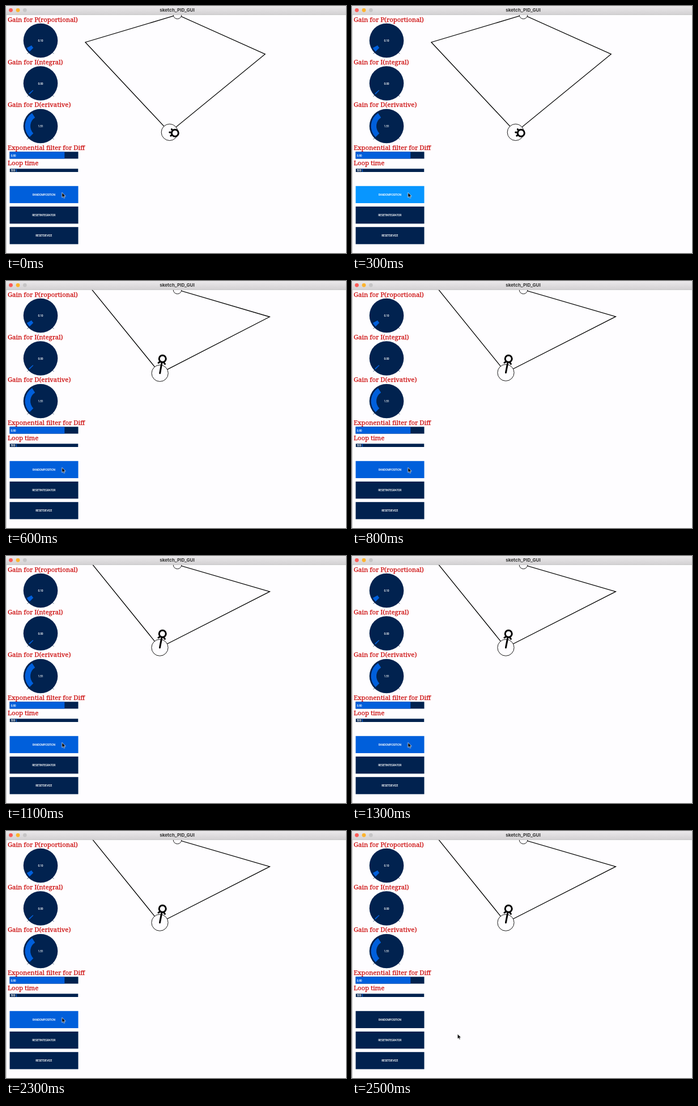
Write an HTML page that moves like this. It is 600 by 436 pixels and loops after 2600 ms.

```html
<!DOCTYPE html>
<html lang="en">
<head>
<meta charset="utf-8">
<title>sketch_PID_GUI</title>
<style>
  html, body { margin: 0; width: 100%; height: 100%; overflow: hidden; background: #fefdff; }
  svg { display: block; width: 100vw; height: 100vh; }
  .title { font: 700 8.1px Inter, sans-serif; fill: #333; text-anchor: middle; }
  .label { font: 11.3px "Noto Serif", serif; fill: #cc0808; stroke: #cc0808; stroke-width: .25; }
  .tiny { font: 500 5px Roboto, sans-serif; letter-spacing: -.25px; fill: #fff; }
  .mid { text-anchor: middle; }
  .navy { fill: #01224f; }
  .blue { fill: #005fdb; }
  .arm { fill: none; stroke: #000; stroke-width: 1.3; }
  .joint { fill: #fefdff; stroke: #000; stroke-width: .9; }
  .bold { fill: #fefdff; stroke: #000; stroke-width: 3; stroke-linecap: round; }
  #press { animation: press 2600ms step-end infinite; }
  #cursor { animation: point 2600ms step-end infinite; }
  @keyframes press {
    0% { fill: #005fdb; }
    7.69% { fill: #0896ff; }
    15.38% { fill: #005fdb; }
    96.15%, 100% { fill: #01224f; }
  }
  @keyframes point {
    0% { transform: translate(98.7px, 329.2px); }
    96.15%, 100% { transform: translate(186.2px, 358.2px); }
  }
</style>
</head>
<body>
<svg viewBox="0 0 600 436">
  <clipPath id="view"><rect y="15.5" width="600" height="421"/></clipPath>
  <clipPath id="thin"><rect x="6.5" y="287.3" width="121" height="5.7"/></clipPath>
  <linearGradient id="bar" x2="0" y2="1">
    <stop stop-color="#ebe9eb"/>
    <stop offset="1" stop-color="#d2d0d2"/>
  </linearGradient>
  <rect width="600" height="436" fill="#fefdff"/>
  <rect width=".8" height="436" fill="#bbb"/>

  <g clip-path="url(#view)">
    <path id="arm" class="arm"/>
    <circle class="joint" cx="302.5" cy="15.5" r="7.3"/>
    <circle id="tool" class="joint" r="14.6"/>
    <path id="force" class="bold"/>
    <circle id="goal" class="bold" r="6"/>
  </g>

  <rect width="600" height="15.5" fill="url(#bar)"/>
  <rect y="15" width="600" height=".6" fill="#b8b7b8"/>
  <circle cx="8.5" cy="7.3" r="3.4" fill="#fc5b57"/>
  <circle cx="21" cy="7.3" r="3.4" fill="#fdb42e"/>
  <circle cx="33.3" cy="7.3" r="3.4" fill="#c6c5c6"/>
  <text class="title" x="302" y="9.9">sketch_PID_GUI</text>

  <g class="label">
    <text x="3" y="27.5">Gain for P(roportional)</text>
    <text x="3" y="102.9">Gain for I(ntegral)</text>
    <text x="3" y="178.4">Gain for D(erivative)</text>
    <text x="3" y="253.8">Exponential filter for Diff</text>
    <text x="3" y="281">Loop time</text>
  </g>
  <g id="knobs"></g>

  <rect class="navy" x="6.5" y="257.3" width="121" height="12.2"/>
  <rect class="blue" x="6.5" y="257.3" width="96.8" height="12.2"/>
  <text class="tiny" x="8.5" y="265.5">0.80</text>
  <g clip-path="url(#thin)">
    <rect class="navy" x="6.5" y="287" width="121" height="6"/>
    <rect class="blue" x="18" y="287" width="1" height="6"/>
    <text class="tiny" x="8.5" y="292.4">500</text>
  </g>

  <rect id="press" x="6.5" y="317.8" width="121" height="30.2"/>
  <rect class="navy" x="6.5" y="354" width="121" height="30.2"/>
  <rect class="navy" x="6.5" y="390.2" width="121" height="30.2"/>
  <g class="tiny mid">
    <text x="66.7" y="334.9">RANDOMPOSITION</text>
    <text x="66.7" y="371.1">RESETINTEGRATOR</text>
    <text x="66.7" y="407.3">RESETDEVICE</text>
  </g>

  <path id="cursor" d="M0 0V8.8L2 7L3.4 10L4.9 9.3L3.6 6.4H6.4Z" fill="#000" stroke="#fff" stroke-width=".7"/>
</svg>
<script>
const $ = id => document.getElementById(id);
const LOOP = 2600, STEP = 100;
const BASE = [302.5, 15.5], UPPER = 169.6, LOWER = 217.7;
const rad = deg => deg * Math.PI / 180;
const mix = (a, b, p) => a + (b - a) * p;
const polar = ([x, y], r, deg) => [x + r * Math.cos(rad(deg)), y + r * Math.sin(rad(deg))];
const pt = p => p.map(v => v.toFixed(2)).join(' ');

function knob(y, value, sweep) {
  const c = [61, y], from = 135, to = from + sweep;
  const ring = `M${pt(polar(c, 27.5, from))}A27.5 27.5 0 0 1 ${pt(polar(c, 27.5, to))}` +
    `L${pt(polar(c, 18, to))}A18 18 0 0 0 ${pt(polar(c, 18, from))}Z`;
  const ticks = [45, 135].map(a => `M${pt(polar(c, 30.5, a))}L${pt(polar(c, 33, a))}`).join('');
  return `<circle class="navy" cx="61" cy="${y}" r="30.3"/><path class="blue" d="${ring}"/>` +
    `<path d="${ticks}" stroke="#01224f" stroke-width=".8"/>` +
    `<text class="tiny mid" x="61" y="${y + 2}">${value}</text>`;
}
$('knobs').innerHTML = knob(61, '0.10', 17) + knob(136.5, '0.00', 4) + knob(212, '1.51', 102);

// Tool position: lower crossing of the two forearm circles
function meet(a, b) {
  const dx = b[0] - a[0], dy = b[1] - a[1], d = Math.hypot(dx, dy);
  const h = Math.sqrt(LOWER ** 2 - d * d / 4);
  return [(a[0] + b[0]) / 2 - dy / d * h, (a[1] + b[1]) / 2 + dx / d * h];
}

// Share of the way to the new target
function progress(t) {
  if (t < 400) return 0;
  if (t < 600) return 0.65 * (t - 400) / 100;
  return 1 - 0.02 * Math.exp((600 - t) / 80);
}

function draw(t) {
  const p = progress(t);
  const left = polar(BASE, UPPER, mix(163.4, 187.8, p));
  const right = polar(BASE, UPPER, mix(24.2, 16.2, p));
  const tool = meet(left, right);
  const goal = t < 400 ? [298.3, 224.2] : [276.2, 137.2];
  $('arm').setAttribute('d', `M${pt(BASE)}L${pt(left)}L${pt(tool)}L${pt(right)}Z`);
  for (const [id, [x, y]] of [['tool', tool], ['goal', goal]])
    $(id).setAttribute('transform', `translate(${x} ${y})`);

  const tip = [0, 1].map(i => mix(tool[i], goal[i], 0.9));
  const back = Math.atan2(tool[1] - goal[1], tool[0] - goal[0]) * 180 / Math.PI;
  const wings = [-45, 45].map(a => `M${pt(tip)}L${pt(polar(tip, 8.2, back + a))}`).join('');
  $('force').setAttribute('d', `M${pt(tool)}L${pt(tip)}${wings}`);
}

function frame() {
  const t = performance.now() % LOOP;
  draw(Math.floor(t / STEP) * STEP);
  requestAnimationFrame(frame);
}
frame();
</script>
</body>
</html>
```
